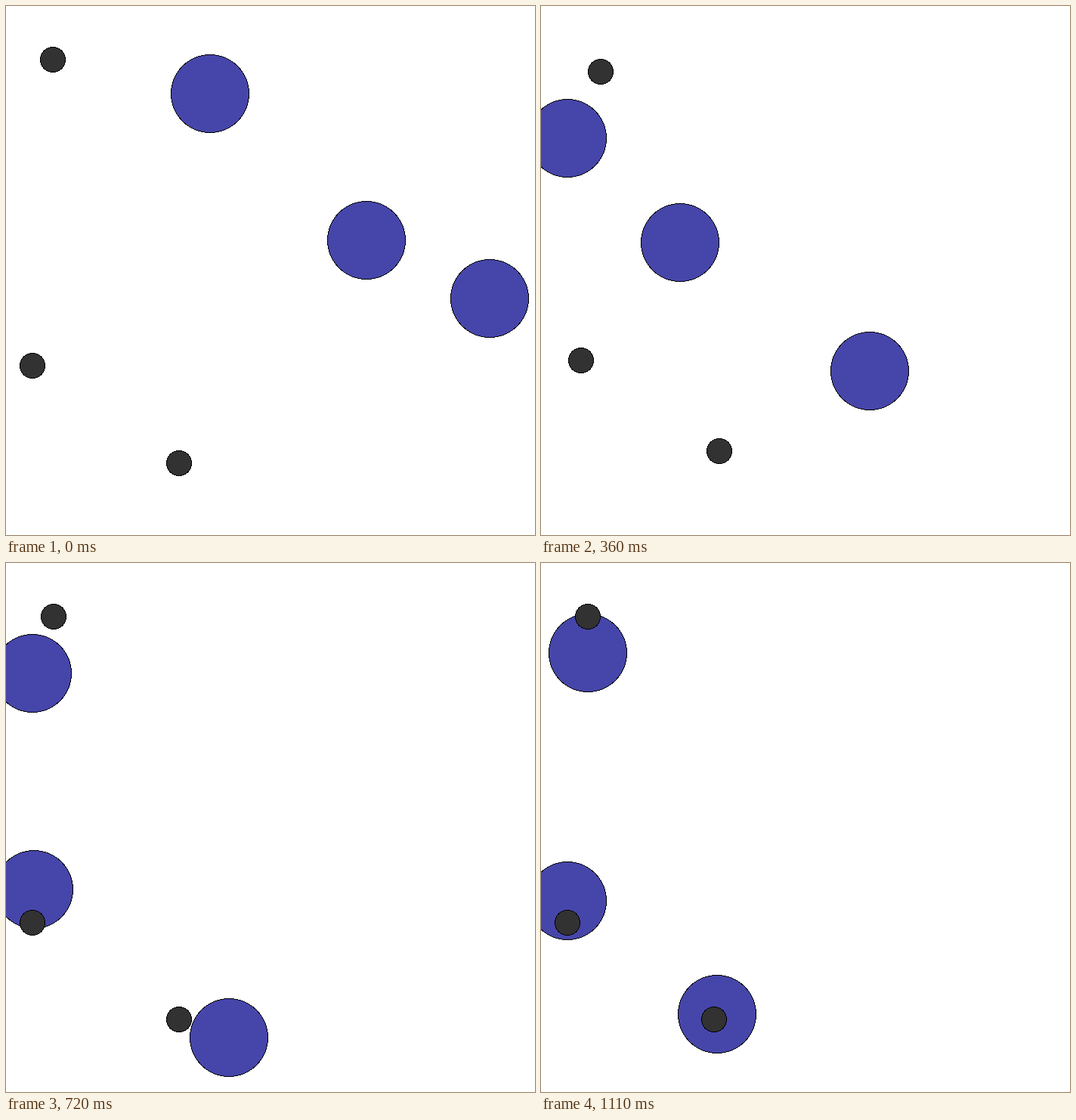
Write an HTML page with a canvas that moves like this. It is 700x700 px and loops after 1.17 s.

```html
<!DOCTYPE html>
<html lang="en">
<head>
<meta charset="utf-8">
<title>Chasing discs</title>
<style>
html, body { margin: 0; width: 100%; height: 100%; overflow: hidden; background: #fff; }
canvas { display: block; width: 700px; height: 700px; }
</style>
</head>
<body>
<canvas id="stage" width="700" height="700"></canvas>
<script>
const ctx = document.getElementById("stage").getContext("2d");
const LOOP = 1170, TICK = 30, SIZE = 700, CENTER = SIZE / 2, REACH = 315;
const THRUST = 17.234, DRAG = 0.75;

// World coordinates have their origin at the middle of the stage.
// Each disc gets one push per step: left, right, up, down or none.
const discs = [
  { x: -79.01, y: -233.05, pushes: "LLLLLDDRLRUUR" },
  { x: 127, y: -39.05, pushes: "LLLLLLLDD" + "RL".repeat(8) },
  { x: 290.4, y: 37.9, pushes: "LLLDDLDDLL.URD.UL" }
];
const dots = [
  { x: -287.3, y: -278.97 },
  { x: -315, y: 126.65 },
  { x: -121, y: 255 }
];
const PUSH = { L: [-1, 0], R: [1, 0], U: [0, -1], D: [0, 1] };

// Speed fades by the drag, then the push is added.
function place(disc, steps) {
  let { x, y } = disc, vx = 0, vy = 0;
  for (let i = 0; i < steps; i++) {
    const [px, py] = PUSH[disc.pushes[i]] || [0, 0];
    vx = vx * DRAG + px * THRUST;
    vy = vy * DRAG + py * THRUST;
    x += vx;
    y += vy;
  }
  return { x, y };
}

// Hard-edged disc, filled row by row.
function fillDisc(x, y, r, color) {
  ctx.fillStyle = color;
  for (let row = -r; row < r; row++) {
    const half = Math.round(Math.sqrt(r * r - (row + 0.5) ** 2));
    ctx.fillRect(x - half, y + row, half * 2, 1);
  }
}

function ball(p, zoom, r, color) {
  const x = Math.floor(CENTER + p.x * zoom), y = Math.floor(CENTER + p.y * zoom);
  fillDisc(x, y, r, "#000");
  fillDisc(x, y, r - 1, color);
}

function draw(time) {
  // Steps last one and two ticks in turn.
  const tick = Math.floor((time % LOOP) / TICK);
  const step = Math.max(0, Math.ceil((tick + 1) * 2 / 3) - 2);
  const big = discs.map(d => place(d, step));

  // Zoom out so that everything stays inside the padded view.
  const extent = Math.max(REACH, ...[...big, ...dots].flatMap(p => [Math.abs(p.x), Math.abs(p.y)]));
  const zoom = REACH / extent;

  ctx.fillStyle = "#fff";
  ctx.fillRect(0, 0, SIZE, SIZE);
  big.forEach(p => ball(p, zoom, 52, "#4646aa"));
  dots.forEach(p => ball(p, zoom, 17, "#323232"));
}

const start = performance.now();
function loop() {
  draw(performance.now() - start);
  requestAnimationFrame(loop);
}
loop();
</script>
</body>
</html>
```
